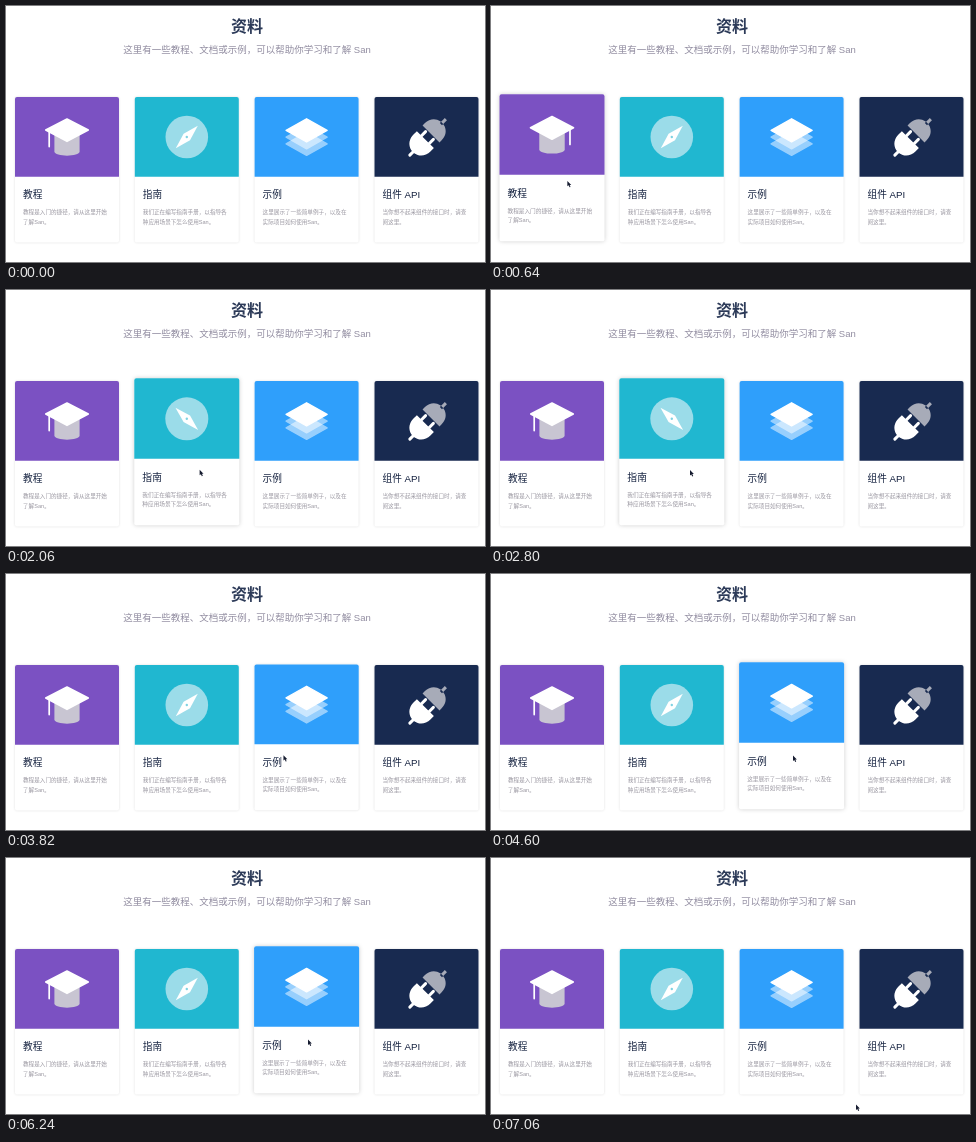
An HTML page that plays this animation: 479 px wide and 256 px high, repeating every 7.08 s.

```html
<!DOCTYPE html>
<html lang="zh-CN">
<head>
<meta charset="utf-8">
<style>
html, body { margin: 0; width: 100%; height: 100%; overflow: hidden; background: #fff; }
svg { display: block; width: 479px; height: 256px; }
text { font-family: "Liberation Sans", "Noto Sans CJK SC", "Noto Sans CJK", sans-serif; }
.title { font-size: 16px; font-weight: 700; fill: #2c3a58; text-anchor: middle; }
.lead { font-size: 9.5px; font-weight: 300; fill: #918ca0; text-anchor: middle; }
.name { font-size: 9.7px; fill: #14213f; }
.desc { font-size: 5.6px; fill: #98959f; }
</style>
</head>
<body>
<svg viewBox="0 0 479 256">
  <text class="title" x="241" y="25.6">资料</text>
  <text class="lead" x="241" y="47.4">这里有一些教程、文档或示例，可以帮助你学习和了解 San</text>
  <g id="cards"></g>
  <path id="cursor" d="M0 0V5.4L1.3 4.4L2.2 6.4L3.2 6L2.3 4H3.9Z" fill="#161c30" stroke="#fff" stroke-width=".7" paint-order="stroke"/>
</svg>
<script>
const LOOP = 7080, FADE = 200;

// Icons are drawn around the centre of each coloured panel.
const layer = (y, opacity) =>
  `<path d="M0 ${y - 11.6}L20.5 ${y}L0 ${y + 11.6}L-20.5 ${y}Z" opacity="${opacity}" fill="#fff" stroke="#fff" stroke-width="1.4" stroke-linejoin="round"/>`;

const icons = {
  cap: `<path d="M-12.6 -4V14.5C-12.6 20 12.6 20 12.6 14.5V-4Z" fill="#c8c5d2"/>
    <path d="M0 -18L21.3 -7L0 4.4L-21.3 -7Z" fill="#fff" stroke="#fff" stroke-width="1.6" stroke-linejoin="round"/>
    <path d="M-17.8 -5V9.6" stroke="#fff" stroke-width="1.7" stroke-linecap="round"/>`,
  compass: `<circle r="21.3" fill="#9bdce9"/>
    <g class="needle"><path d="M11 -11.2L3.2 3.2L-11 11.2L-3.2 -3.2Z" fill="#fff"/>
    <circle r="1.2" fill="#7fd2e2"/></g>`,
  layers: layer(6.8, .5) + layer(.2, .5) + layer(-6.6, 1),
  plug: `<g transform="translate(1 .5) rotate(45)">
    <path d="M-12 -5H12V-8C12 -25 -12 -25 -12 -8ZM-1.5 -19V-26H1.5V-19Z" fill="#a7abb8"/>
    <path d="M-12 3H12V7.5C12 25 -12 25 -12 7.5Z" fill="#fff"/>
    <path d="M-5.5 4V-2.8M5.5 4V-2.8M0 18V25" stroke="#fff" stroke-width="3" stroke-linecap="round"/></g>`
};

// on/off: when the pointer enters and leaves the card
const cards = [
  { x: 9, color: "#7b51c2", icon: "cap", name: "教程", desc: ["教程是入门的捷径，请从这里开始", "了解San。"], on: 150, off: 1690 },
  { x: 128.8, color: "#20b7d0", icon: "compass", name: "指南", desc: ["我们正在编写指南手册，以指导各", "种应用场景下怎么使用San。"], on: 1760, off: 3610 },
  { x: 248.6, color: "#2f9ffb", icon: "layers", name: "示例", desc: ["这里展示了一些简单例子，以及在", "实际项目如何使用San。"], on: 3760, off: 6760 },
  { x: 368.5, color: "#182a50", icon: "plug", name: "组件 API", desc: ["当你想不起来组件的接口时，请查", "阅这里。"] }
];

// Pointer stops: time, x, y
const stops = [
  [0, -4, 169], [700, 78, 175], [1450, 78, 175], [2150, 199, 180],
  [3350, 199, 180], [4040, 302, 181.5], [6500, 302, 181.5], [7020, 365, 246.5], [LOOP, 365, 246.5]
];

const clamp = v => Math.max(0, Math.min(1, v));
const ease = v => { v = clamp(v); return v * v * (3 - 2 * v); };
const mix = (a, b, k) => a + (b - a) * k;

const root = document.getElementById("cards");
const cursor = document.getElementById("cursor");

root.innerHTML = cards.map(c => `<g>
  <rect class="paper" x="${c.x}" y="91" width="104" height="145.5" rx="2" fill="#fff"/>
  <path d="M${c.x} 170.7V93q0 -2 2 -2h100q2 0 2 2V170.7Z" fill="${c.color}"/>
  <g transform="translate(${c.x + 52} 131)"><g class="icon">${icons[c.icon]}</g></g>
  <text class="name" x="${c.x + 8}" y="192.2">${c.name}</text>
  ${c.desc.map((s, i) => `<text class="desc" x="${c.x + 8}" y="${208.3 + i * 9.2}">${s}</text>`).join("")}
</g>`).join("");

cards.forEach((c, i) => {
  c.el = root.children[i];
  c.paper = c.el.querySelector(".paper");
  c.art = c.el.querySelector(".icon");
  c.needle = c.el.querySelector(".needle");
});

function drawCard(c, t) {
  const k = c.on === undefined ? 0 : ease((t - c.on) / FADE) - ease((t - c.off) / FADE);
  const cx = c.x + 52;
  c.el.setAttribute("transform", `translate(${cx} ${164 - 1.9 * k}) scale(${1 + .01 * k}) translate(${-cx} -164)`);
  c.paper.style.filter = `drop-shadow(0 ${mix(.6, .8, k)}px ${mix(1, 2, k)}px rgba(0,0,0,${mix(.13, .2, k)}))`;
  if (c.icon === "cap") c.art.setAttribute("transform", `scale(${Math.cos(Math.PI * k)} 1)`);
  if (c.needle) c.needle.setAttribute("transform", `rotate(${-90 * k})`);
}

function drawCursor(t) {
  const i = stops.findIndex(s => s[0] > t);
  const a = stops[i - 1], b = stops[i];
  const k = ease((t - a[0]) / (b[0] - a[0]));
  cursor.setAttribute("transform", `translate(${mix(a[1], b[1], k)} ${mix(a[2], b[2], k)})`);
}

const start = performance.now();
function frame() {
  const t = (performance.now() - start) % LOOP;
  cards.forEach(c => drawCard(c, t));
  drawCursor(t);
  requestAnimationFrame(frame);
}
frame();
</script>
</body>
</html>
```
